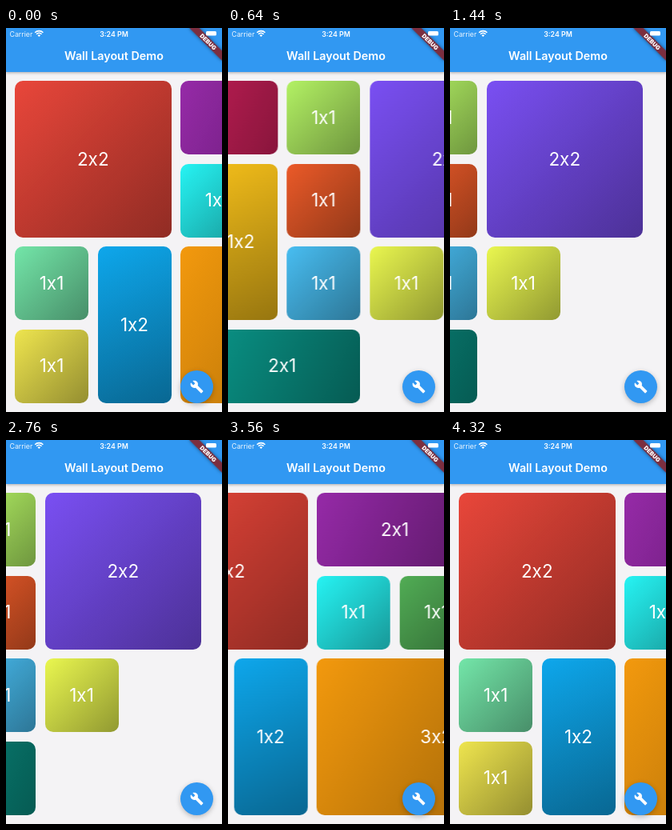
Animation of 270x480 px, one loop 4.36 s. Source, as an HTML page:

```html
<!DOCTYPE html>
<html lang="en">
<head>
<meta charset="utf-8">
<title>Wall Layout Demo</title>
<style>
  html, body { margin: 0; width: 100%; height: 100%; overflow: hidden; }
  body { position: relative; background: #f4f3f5; color: #fff; font-family: Inter, Roboto, sans-serif; }
  #wall { position: absolute; left: 11px; top: 66px; will-change: transform; }
  .tile { position: absolute; display: flex; align-items: center; justify-content: center;
    border-radius: 10px; font-size: 22.5px; line-height: 1; filter: saturate(.92); }
  #bar { position: absolute; left: 0; right: 0; top: 0; height: 55px; background: #3198f2;
    box-shadow: 0 1.5px 3px rgba(0, 0, 0, .25); }
  #fab { position: absolute; left: 218px; top: 428px; width: 41px; height: 41px; border-radius: 50%;
    background: #3198f2; box-shadow: 0 2px 6px rgba(0, 0, 0, .25); }
  svg { position: absolute; left: 0; top: 0; }
  #banner { filter: drop-shadow(0 0 2px rgba(0, 0, 0, .5)); }
</style>
</head>
<body>
<div id="wall"></div>
<div id="bar"></div>
<div id="fab"></div>
<svg width="270" height="480" fill="#fff">
  <g font-size="8.8">
    <text x="4.5" y="10.7" opacity=".9">Carrier</text>
    <text x="135" y="10.7" text-anchor="middle" font-weight="600">3:24 PM</text>
  </g>
  <g fill="none" stroke="#fff" stroke-width="1.6">
    <path d="M36.2 5.7a7.2 7.2 0 0 1 10.2 0M38 7.7a4.7 4.7 0 0 1 6.6 0"/>
  </g>
  <path d="M39.5 9.2a2.6 2.6 0 0 1 3.6 0L41.3 11z"/>
  <text x="135" y="40" text-anchor="middle" font-size="14.3" font-weight="600">Wall Layout Demo</text>
  <g transform="translate(270 0) rotate(45)">
    <rect id="banner" x="-28.8" y="20.2" width="57.6" height="8.6" fill="#7c2e3f"/>
    <text y="27.1" text-anchor="middle" font-size="7.3" font-weight="900">DEBUG</text>
  </g>
  <rect x="250" y="4" width="13" height="5.5" rx="1.5"/>
  <path transform="translate(229.9 439.9) scale(.72)" d="M22.7 19l-9.1-9.1c.9-2.3.4-5-1.5-6.9-2-2-5-2.4-7.4-1.3L9 6 6 9 1.6 4.7C.4 7.1.9 10.1 2.9 12.1c1.9 1.9 4.6 2.4 6.9 1.5l9.1 9.1c.4.4 1 .4 1.4 0l2.3-2.3c.5-.4.5-1.1.1-1.4z"/>
</svg>
<script>
const wall = document.getElementById('wall');
const PITCH = 103.5, GAP = 11.5, LOOP = 4360, STEP = 40;
const END = 690, GRAB = 687;

// column, row, width, height, colour
const tiles = [
  [0, 0, 2, 2, 'f44336'], [0, 2, 1, 1, '6ce8a6'], [0, 3, 1, 1, 'f0e642'],
  [1, 2, 1, 2, '03a9f4'], [2, 0, 2, 1, '9c27b0'], [2, 1, 1, 1, '18f8f8'],
  [2, 2, 3, 2, 'fa9800'], [3, 1, 1, 1, '4caf50'], [4, 0, 2, 1, 'e91e63'],
  [4, 1, 1, 1, '448af8'], [5, 1, 1, 2, 'f8be0c'], [5, 3, 2, 1, '009688'],
  [6, 0, 1, 1, 'b0f45a'], [6, 1, 1, 1, 'f65822'], [6, 2, 1, 1, '40c0f8'],
  [7, 0, 2, 2, '7c4dff'], [7, 2, 1, 1, 'eaf842']
];

const darken = hex => `rgb(${hex.match(/../g).map(c => Math.round(parseInt(c, 16) * .62))})`;

for (const [col, row, cols, rows, hex] of tiles) {
  const w = cols * PITCH - GAP, h = rows * PITCH - GAP;
  const angle = Math.PI / 2 + Math.atan2(h, w);
  const tile = document.createElement('div');
  tile.className = 'tile';
  tile.textContent = `${cols}x${rows}`;
  tile.style.cssText = `left:${col * PITCH}px;top:${row * PITCH}px;width:${w}px;height:${h}px;` +
    `background:linear-gradient(${angle}rad,#${hex},${darken(hex)})`;
  wall.append(tile);
}

// Distance after t seconds: finger drag, friction glide, then a springy stop at the edge.
function fling(t, total, dragTime, drag, speed) {
  if (t <= 0) return 0;
  if (t < dragTime) return drag * (t / dragTime) ** (speed * dragTime / drag);
  t -= dragTime;
  const hit = -Math.log(1 - 2 * (total - drag) / speed) / 2;
  if (t < hit) return drag + speed / 2 * (1 - Math.exp(-2 * t));
  const v = speed * Math.exp(-2 * hit), slow = 9.08, fast = 22.03;
  t -= hit;
  return total + v / (fast - slow) * (Math.exp(-slow * t) - Math.exp(-fast * t));
}

function scrollAt(ms) {
  if (ms >= 4320) return 0;
  if (ms >= 2760) return GRAB - fling((ms - 2900) / 1000, GRAB, .1, 105, 1409);
  if (ms >= 1440) return END;
  return fling((ms - 60) / 1000, END, .06, 71.5, 1507);
}

const start = performance.now();
function draw() {
  const ms = (performance.now() - start) % LOOP;
  wall.style.transform = `translateX(${-scrollAt(Math.floor(ms / STEP) * STEP)}px)`;
  requestAnimationFrame(draw);
}
draw();
</script>
</body>
</html>
```
